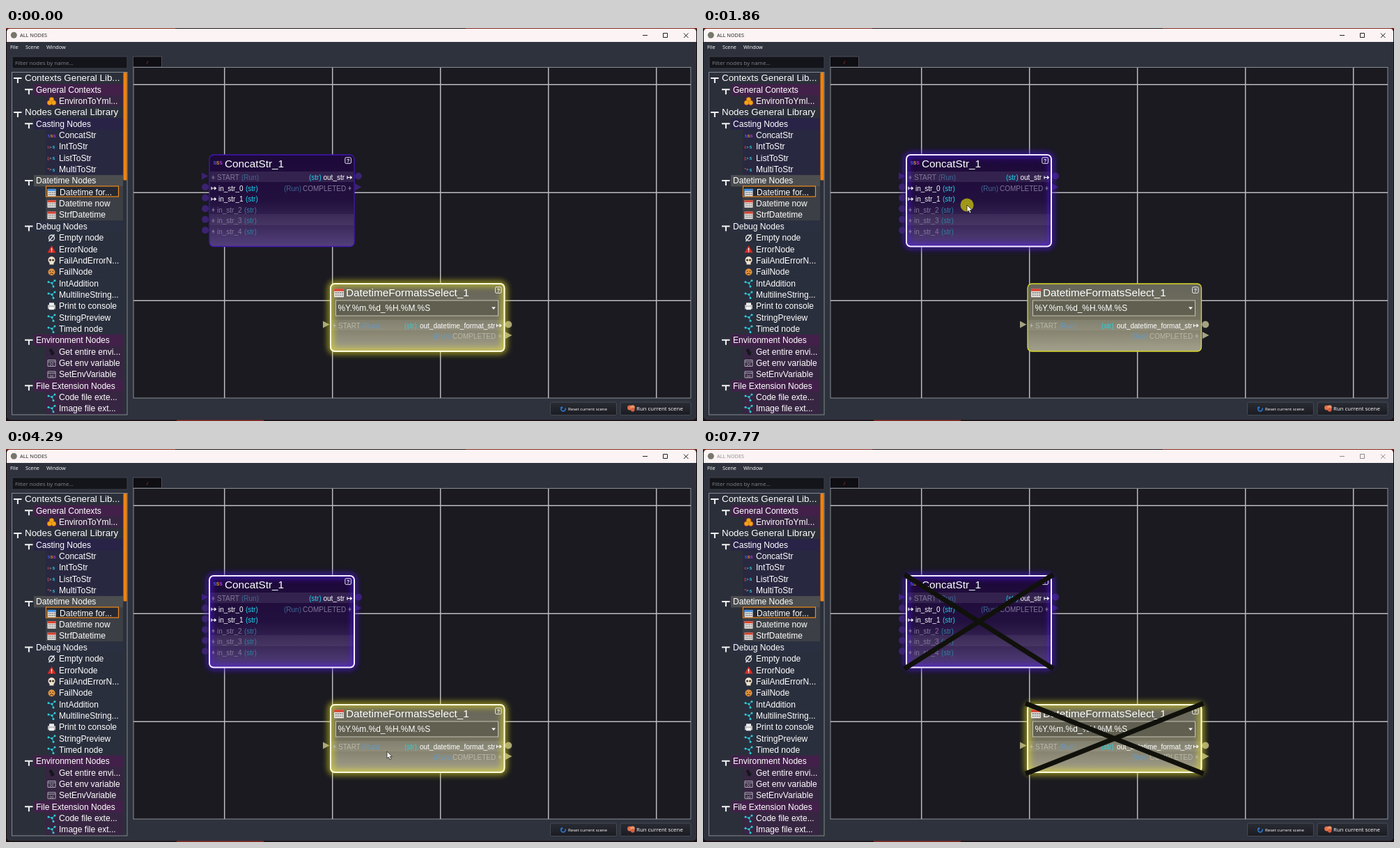
Recreate the animation shown at these times as an HTML page. Size 992 by 564 pixels, loop 7820 ms.

```html
<!DOCTYPE html>
<html lang="en">
<head>
<meta charset="utf-8">
<title>All nodes</title>
<style>
  html, body { margin: 0; width: 100%; height: 100%; overflow: hidden; background: #1c0d10; }
  svg { display: block; width: 992px; height: 564px; }
  text { font-family: "Liberation Sans", Arial, sans-serif; white-space: pre; }
  .ui { font-family: "Open Sans", sans-serif; }
</style>
</head>
<body>
<svg id="stage" viewBox="0 0 992 564" xmlns="http://www.w3.org/2000/svg"></svg>
<script>
const LOOP = 7820;
const rect = (x, y, w, h, fill, more = '') =>
  `<rect x="${x}" y="${y}" width="${w}" height="${h}" fill="${fill}" ${more}/>`;
const text = (x, y, s, size, fill = '#fff', more = '') =>
  `<text x="${x}" y="${y}" font-size="${size}" fill="${fill}" ${more}>${s}</text>`;
const ui = (x, y, s, size, fill, more = '') => text(x, y, s, size, fill, `class="ui" ${more}`);
const line = (d, stroke, width = 1, more = '') =>
  `<path d="${d}" fill="none" stroke="${stroke}" stroke-width="${width}" ${more}/>`;
const shape = (d, fill, more = '') => `<path d="${d}" fill="${fill}" ${more}/>`;
const dot = (x, y, r, fill, more = '') => `<circle cx="${x}" cy="${y}" r="${r}" fill="${fill}" ${more}/>`;
const at = (x, y, body, scale = 1) => `<g transform="translate(${x} ${y}) scale(${scale})">${body}</g>`;
const gradient = (id, stops) => `<linearGradient id="${id}" x2="0" y2="1">` +
  stops.map(([o, c]) => `<stop offset="${o}" stop-color="${c}"/>`).join('') + '</linearGradient>';

// Small icons, centred on 0,0
const letters = colors => [...'sss'].map((c, i) =>
  text(-6 + i * 4, 2.4, c, 7.6, colors[i], 'font-weight="bold"')).join('');
const calendar = head => rect(-6, -5, 12, 10.5, '#e9e6e2') + rect(-6, -5, 12, 3, head) +
  line('M-4.5 0H5M-4.5 3H5', '#777', 1.6, 'stroke-dasharray="1.6 1"');
const convert = from => text(-6, 2, from, 6, '#e0524a', 'font-weight="bold"') +
  text(-3.5, 2, '&gt;', 6, '#ccc') + text(1, 2.3, 's', 7, '#25c6dc', 'font-weight="bold"');
const icons = {
  hive: [[0, -2.5], [-3, 2], [3, 2]].map(([x, y]) => dot(x, y, 3.2, '#f5a31a', 'stroke="#c87808" stroke-width=".6"')).join(''),
  sss: letters(['#3d55e8', '#d88a20', '#a337d8']),
  int: convert('i'), list: convert('['), multi: convert('*'),
  blueDate: calendar('#3f8fe0'), date: calendar('#d8402c'),
  empty: `<circle r="4" fill="none" stroke="#eee" stroke-width="1.3"/>` + line('M-4 5L4-5', '#eee', 1.3),
  error: shape('M0-5.5L6 5H-6Z', '#d92b20') + rect(-.7, -2, 1.4, 4, '#fff') + rect(-.7, 3, 1.4, 1.2, '#fff'),
  skull: dot(0, -1, 5, '#eee3cf') + rect(-3, 2, 6, 3.5, '#eee3cf') + dot(-2, -1, 1.5, '#3a2a20') + dot(2, -1, 1.5, '#3a2a20'),
  fail: dot(0, 0, 5, '#e0913c') + dot(-2, -1, .8, '#432') + dot(2, -1, .8, '#432') + line('M-2.5 3Q0 .5 2.5 3', '#432'),
  node: line('M-4.5-2L.5-.5L4.5-4M.5-.5L2.5 4.5', '#1fb6c8') +
    [[-4.5, -2], [4.5, -4], [2.5, 4.5], [.5, -.5]].map(p => dot(...p, 1.5, '#2fd0dc')).join(''),
  print: rect(-5.5, -2, 11, 6, '#bbb') + rect(-3.5, -5, 7, 4, '#eee') + rect(-3.5, 1, 7, 4, '#f5f5f5'),
  env: dot(-1, -2, 2.5, '#15181c') + dot(1, 2, 2.8, '#15181c'),
  box: line('M-5.5-4.5H5.5V4.5H-5.5ZM-5.5-2H5.5', '#a9abb5') + text(-3, 3.2, '{x}', 5, '#ccc'),
};

// Library tree: [level, label, icon]
const rows = [
  [0, 'Contexts General Lib...'], [1, 'General Contexts'], [2, 'EnvironToYml...', 'hive'],
  [0, 'Nodes General Library'], [1, 'Casting Nodes'], [2, 'ConcatStr', 'sss'], [2, 'IntToStr', 'int'],
  [2, 'ListToStr', 'list'], [2, 'MultiToStr', 'multi'], [1, 'Datetime Nodes'],
  [2, 'Datetime for...', 'blueDate'], [2, 'Datetime now', 'date'], [2, 'StrfDatetime', 'date'],
  [1, 'Debug Nodes'], [2, 'Empty node', 'empty'], [2, 'ErrorNode', 'error'], [2, 'FailAndErrorN...', 'skull'],
  [2, 'FailNode', 'fail'], [2, 'IntAddition', 'node'], [2, 'MultilineString...', 'node'],
  [2, 'Print to console', 'print'], [2, 'StringPreview', 'node'], [2, 'Timed node', 'node'],
  [1, 'Environment Nodes'], [2, 'Get entire envi...', 'env'], [2, 'Get env variable', 'box'],
  [2, 'SetEnvVariable', 'box'], [1, 'File Extension Nodes'], [2, 'Code file exte...', 'node'], [2, 'Image file ext...', 'node'],
];
const tints = { General: '#42204a', Casting: '#292348', Datetime: '#4c4d4f', Debug: '#2b3040', Environment: '#42204a', File: '#42204a' };

function tree() {
  let tint;
  return rows.map(([level, label, icon], i) => {
    const y = 72 + i * 16.34;
    const selected = icon === 'blueDate';
    if (level === 0) tint = null;
    if (level === 1) tint = tints[label.split(' ')[0]];
    let out = tint ? rect(level === 1 ? 40 : 57, y - 8, level === 1 ? 128 : 111, 16.4, tint, `opacity="${level === 1 ? 1 : .55}"`) : '';
    if (selected) out += rect(57.5, 227, 104, 15, '#262932', 'stroke="#f08a1c" stroke-width="1.2"');
    if (level < 2) {
      const x = 11 + level * 16;
      out += shape(`M${x} ${y - 1}h11.5v2h-4.6v6h-2v-6h-4.9z`, '#f4f4f4');
    } else out += at(65.5, y + .5, icons[icon]);
    return out + text([27, 43, selected ? 77 : 76][level], y + 4.4, label, level ? 12.05 : 13.35);
  }).join('');
}

// Node parts
const arrow = (x, y) => line(`M${x} ${y - 2.2}v4.4M${x} ${y}h6M${x + 4} ${y - 2}l2.4 2l-2.4 2`, '#fff', 1.1);
const pin = (x, y, c) => at(x, y, line('M0-3V3M-2-1L2 1M-2 1L2-1', c, .8));
const play = (x, y, c) => shape(`M${x} ${y - 5}l9.5 5l-9.5 5z`, c);
const help = (x, y) => rect(x, y, 8.6, 8.6, 'none', 'rx="1.5" stroke="#e8e6ee"') +
  text(x + 2.3, y + 7, '?', 7, '#fff', 'font-weight="bold"');
const pair = (x1, s1, c1, x2, s2, c2, y) => text(x1, y + 3.5, s1, 10, c1) + text(x2, y + 3.5, s2, 10, c2);

function frame(id, x, y, w, h, edge, halo, rim) {
  const box = (fill, stroke, width, more = '') =>
    rect(x, y, w, h, fill, `rx="6" stroke="${stroke}" stroke-width="${width}" ${more}`);
  return {
    base: box(`url(#${id}Fill)`, edge, 1.3),
    glow: `<g id="${id}Glow">${box('none', halo, 8, 'filter="url(#blur)" opacity=".65"')}${box('none', rim, 2)}</g>`,
    cross: line(`M${x - 3} ${y - 2}L${x + w + 3} ${y + h + 2}M${x + w + 3} ${y - 2}L${x - 3} ${y + h + 2}`, '#11110c', 7),
  };
}
const concat = frame('concat', 292, 182, 208, 131.5, '#4316b4', '#5016e8', '#f4eeff');
const dates = frame('dates', 466, 367, 249.5, 97, '#d9d92a', '#e8e020', '#ffffe0');

function concatNode() {
  const port = '#3b2370', dim = '#81779a', cyan = '#20d4ee', run = '#3f6791';
  const slots = [230, 245.5, 261, 276.5, 292].map((y, i) => {
    const on = i < 2;
    return dot(286, y - 1.7, 5, port) + (on ? arrow(295, y) : pin(297.5, y, dim)) +
      pair(on ? 305 : 303, 'in_str_' + i, on ? '#fff' : dim, on ? 344 : 342, '(str)', on ? cyan : '#2f7f9e', y);
  }).join('');
  return play(281, 212.5, port) + dot(506, 212.5, 5, port) + play(501, 228.2, port) + concat.base +
    rect(293, 206, 206, 15, '#fff', 'opacity=".09"') + rect(293, 267, 206, 16, '#fff', 'opacity=".06"') +
    concat.glow + at(304, 193, icons.sss, 1.1) + text(314, 199.5, 'ConcatStr_1', 15.3) + help(486.8, 185.8) +
    pin(297.5, 214.5, dim) + pair(303, 'START', dim, 338, '(Run)', run, 214.5) +
    pair(435, '(str)', cyan, 455.5, 'out_str', '#fff', 214.5) + arrow(490, 214.5) +
    pair(399, '(Run)', run, 426, 'COMPLETED', dim, 230) + pin(493.5, 230, dim) + slots;
}

function datesNode() {
  const port = '#a5a282', dim = '#b9b7a8', run = '#6699c2';
  return play(455, 425.5, port) + dot(721.3, 425.5, 5, port) + play(717, 441, port) + dates.base +
    rect(467, 419, 247, 15, '#fff', 'opacity=".08"') + dates.glow +
    at(478, 380, icons.date, 1.15) + text(488, 384.5, 'DatetimeFormatsSelect_1', 15.3) + help(702.5, 371.8) +
    rect(473.5, 391, 233, 22, '#605f50', 'stroke="#c6c4b4"') + text(476.5, 406.3, '%Y.%m.%d_%H.%M.%S', 11.9) +
    shape('M697 400.5h6l-3 3.4z', '#fff') +
    pin(471.5, 427, dim) + pair(477, 'START', dim, 511, '(Run)', run, 427) +
    pair(572, '(str)', '#28d0de', 594, 'out_datetime_format_str', '#fff', 427) + arrow(704.5, 427) +
    pair(614, '(Run)', run, 641, 'COMPLETED', dim, 442) + pin(709, 442, dim);
}

const lines = [313.7, 468.7, 623.7, 778.7, 933.7].map(x => `M${x} 57V531`).join('') +
  [81.2, 236.2, 391.2].map(y => `M183 ${y}H983`).join('');
const button = (x, w) => rect(x, 537, w, 18.5, 'url(#button)', 'rx="2" stroke="#454a54"');

stage.innerHTML = `<defs>
  ${gradient('button', [[0, '#2a2c34'], [1, '#1b1c22']])}
  ${gradient('concatFill', [[0, '#1d0939'], [.5, '#22103f'], [.75, '#392757'], [1, '#53407c']])}
  ${gradient('datesFill', [[0, '#65645a'], [.5, '#74725f'], [1, '#a3a08c']])}
  <filter id="blur" x="-20%" y="-30%" width="140%" height="160%"><feGaussianBlur stdDeviation="4"/></filter>
  </defs>` +
  rect(0, 0, 243, 2, '#84291c') + rect(660, 0, 332, 2, '#7d261c') + rect(245, 562, 125, 2, '#8a2a20') +
  rect(1, 1, 990, 561.5, '#2e323d', 'rx="5"') +
  shape('M1 20V6q0-5 5-5H986q5 0 5 5V20Z', '#fcf4f4') + dot(11.3, 10.3, 4.5, '#77776c') +
  '<g id="caption">' + ui(20, 13, 'ALL NODES', 7.4, '#222') +
  line('M914 10.5h7M943.5 7.5h6v6h-6zM973 7.5l6.5 6.5M979.5 7.5l-6.5 6.5', '#222') + '</g>' +
  ui(6, 30, 'File', 7.4, '#fff') + ui(28, 30, 'Scene', 7.2, '#fff') + ui(58, 30, 'Window', 7.4, '#fff') +
  rect(9, 41, 165, 17, '#14151b', 'stroke="#3c414b"') + ui(13, 52.7, 'Filter nodes by name...', 7.95, '#81858c') +
  rect(8.5, 63.5, 165.5, 491.5, '#2b2f3a', 'stroke="#848890"') + tree() +
  rect(168.5, 64, 5, 154.5, '#f0820f', 'rx="1"') +
  rect(182.5, 41, 41, 15, '#0e0e13', 'stroke="#4a4e58"') + ui(201.5, 52, '/', 8, '#b03434') +
  rect(183, 56.5, 800, 474.5, '#1a1a20', 'stroke="#8a8d94"') + line(lines, '#bdbbc0', 1.5) +
  concatNode() + datesNode() +
  `<g id="crosses">${concat.cross}${dates.cross}</g>` +
  button(781.5, 95) + at(800, 546.8, line('M-2.8-1.8A3.2 3.2 0 1 0 2.8-1.5', '#2a78d0', 1.6) + shape('M-4.5-2.5l3.6-1.4l0 3.6z', '#2a78d0')) +
  ui(807, 549, 'Reset current scene', 6.1, '#fff') +
  button(882, 101) + at(897.5, 546, dot(-2, -1, 3.4, '#e0714a') + dot(2, -1.5, 3.2, '#f09468') + dot(2.2, 1.8, 2.8, '#d86040')) +
  ui(905, 549.3, 'Run current scene', 7.9, '#fff') +
  dot(0, 0, 9.5, '#a89e16', 'id="halo" opacity=".95"') +
  shape('M0 0V10.2L2.3 8L4 11.8L5.9 11L4.2 7.3H7.3Z', '#fff', 'id="cursor" stroke="#111" stroke-width=".7"');

// Pointer moves: [start, end, x, y]; each leads on from the last place
const home = [668, 570];
const moves = [
  [140, 440, 674, 488], [600, 880, 690, 320], [1420, 1780, 379, 254],
  [1900, 2220, 547, 434], [6620, 6980, 575, 570],
];
const ease = u => u * u * u * (u * (u * 6 - 15) + 10);
function pointer(t) {
  let [x, y] = home;
  for (const [start, end, toX, toY] of moves) {
    if (t < start) break;
    const stepped = Math.floor((t - start) / 40) * 40;
    const k = t >= end ? 1 : ease(stepped / (end - start));
    x += (toX - x) * k;
    y += (toY - y) * k;
  }
  return `translate(${x} ${y})`;
}

const within = (t, ...spans) => spans.some(([a, b]) => t >= a && t < b);
const el = id => document.getElementById(id);
const show = (id, on) => el(id).setAttribute('visibility', on ? 'visible' : 'hidden');

function draw(now) {
  const t = now % LOOP;
  const place = pointer(t);
  el('cursor').setAttribute('transform', place);
  el('halo').setAttribute('transform', place);
  show('halo', within(t, [920, 1000], [1860, 1940], [2300, 2380]));
  show('concatGlow', t >= 1860);
  show('datesGlow', within(t, [0, 920], [2300, LOOP]));
  show('crosses', within(t, [3210, 4290], [4750, 5660], [6120, LOOP]));
  el('caption').setAttribute('opacity', t >= 7730 ? .5 : 1);
}
const begin = performance.now();
function tick() {
  draw(performance.now() - begin);
  requestAnimationFrame(tick);
}
tick();
</script>
</body>
</html>
```
